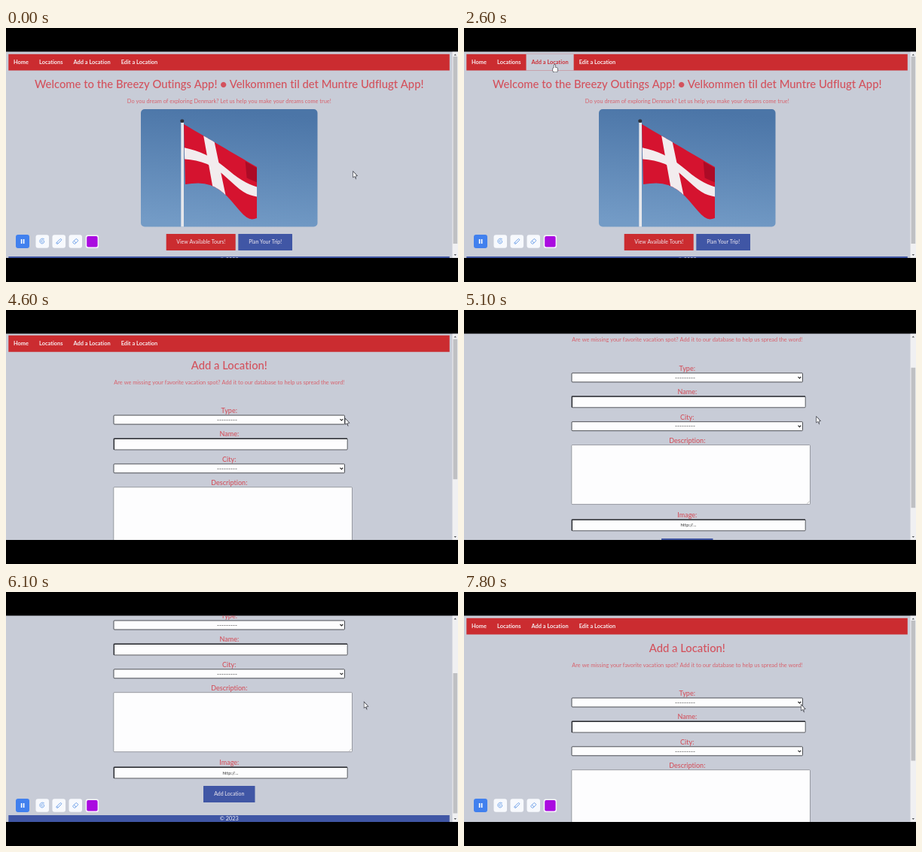
These frames come from a looping animation (600 by 338 pixels, 8 s). An HTML page with a canvas:

```html
<!DOCTYPE html>
<html lang="en">
<head>
<meta charset="utf-8">
<title>Add a location</title>
<style>
  html, body { margin: 0; width: 100%; height: 100%; overflow: hidden; background: #000; }
  canvas { display: block; width: 600px; height: 338px; }
</style>
</head>
<body>
<canvas id="stage"></canvas>
<script>
const W = 600, H = 338, LOOP = 8000;
const TOP = 31.4, BOTTOM = 306, MID = 296.3;
const PAGE_CHANGE = 2900, HOVER_ON = 1070, HOVER_OFF = 3090, TOOLS_BACK = 5500;
const MAX_SCROLL = 103;
const RED = '#cb2c30', BLUE = '#4056a5', BG = '#c8ccd7', INK = '#d3525d', SOFT = '#d8626d';

const canvas = document.getElementById('stage');
const ctx = canvas.getContext('2d');
const ratio = window.devicePixelRatio || 1;
canvas.width = W * ratio;
canvas.height = H * ratio;

// Progress from 0 to 1, eased at both ends
function ramp(t, start, length) {
  const u = Math.max(0, Math.min(1, (t - start) / length));
  return u * u * (3 - 2 * u);
}

// Pointer stops: time, x, y
const stops = [
  [0, 461, 191.5], [1100, 123.5, 53], [1600, 119.5, 49], [2800, 119.5, 49],
  [4600, 450.5, 145], [5100, 468, 142.5], [6100, 475.5, 147], [7500, 447.8, 150.5]
];

function pointerAt(t) {
  const pos = stops[0].slice(1);
  for (let i = 1; i < stops.length; i++) {
    const [t0, x0, y0] = stops[i - 1], [t1, x1, y1] = stops[i];
    const k = ramp(t, t0, t1 - t0);
    pos[0] += (x1 - x0) * k;
    pos[1] += (y1 - y0) * k;
  }
  return pos;
}

// Two wheel notches down, two back up
function scrollAt(t) {
  const notch = start => ramp(t, start, 200);
  return MAX_SCROLL / 2 * (notch(4585) + notch(5060) - notch(6450) - notch(6850));
}

function rect(x, y, w, h, fill, r = 0) {
  ctx.fillStyle = fill;
  ctx.beginPath();
  ctx.roundRect(x, y, w, h, r);
  ctx.fill();
}

function outline(color, width) {
  ctx.strokeStyle = color;
  ctx.lineWidth = width;
  ctx.stroke();
}

function frame(x, y, w, h, color, width = 0.9) {
  rect(x, y, w, h, '#fdfdfe', 1);
  outline(color, width);
}

function trace(points) {
  ctx.beginPath();
  points.forEach(([x, y]) => ctx.lineTo(x, y));
}

function setFont(size, weight = 400) {
  ctx.font = `${weight} ${size}px Lato, "Open Sans", sans-serif`;
  ctx.letterSpacing = '0.01px'; // keeps letters unjoined
}

function text(str, x, y, size, fill, weight, align = 'center') {
  setFont(size, weight);
  ctx.textAlign = align;
  ctx.fillStyle = fill;
  ctx.fillText(str, x, y + size * 0.34);
}

function heading(title, sub) {
  text(title, MID, 75, 14.8, INK, 500);
  text(sub, MID, 97, 7.4, SOFT);
}

function button(label, x, y, w, fill) {
  rect(x, y, w, 22, fill, 0.5);
  text(label, x + w / 2, y + 11, 6.95, '#efe9f0');
}

function navBar(t) {
  rect(3.3, 34.8, 585.5, 21.8, RED);
  const k = ramp(t, HOVER_ON, 300) - ramp(t, HOVER_OFF, 300);
  const mix = (a, b) => Math.round(a + (b - a) * k);
  let x = 10;
  ['Home', 'Locations', 'Add a Location', 'Edit a Location'].forEach((label, i) => {
    setFont(7.4, 700);
    const w = ctx.measureText(label).width;
    const active = i === 2;
    if (active && t >= HOVER_ON && t < HOVER_OFF) rect(x - 7, 34.8, w + 14, 21.8, BG);
    const fill = active ? `rgb(${mix(244, 205)},${mix(238, 48)},${mix(241, 56)})` : '#f8edef';
    text(label, x, 45.5, 7.4, fill, 700, 'left');
    x += w + 14;
  });
}

// Cloth position: u runs from pole to free edge, v from top to bottom
function cloth(u, v) {
  const drop = 80 - 12 * u - 10 * Math.sin(2 * Math.PI * u);
  return [
    236 + 97 * u + 2 * v * (1 - u) + 14 * v * Math.sin(Math.PI * u),
    128 + 57 * u + v * drop
  ];
}

function patch(u0, u1, v0, v1, fill) {
  const steps = 16, upper = [], lower = [];
  for (let i = 0; i <= steps; i++) {
    const u = u0 + (u1 - u0) * i / steps;
    upper.push(cloth(u, v0));
    lower.unshift(cloth(u, v1));
  }
  trace([...upper, ...lower]);
  ctx.fillStyle = fill;
  ctx.fill();
}

function flagPhoto() {
  const sky = ctx.createLinearGradient(300, 108, 285, 265);
  sky.addColorStop(0, '#4b75a7');
  sky.addColorStop(1, '#739bc6');
  rect(179, 108, 234.5, 156.5, sky, 5);
  rect(232.3, 126, 3.7, 138.5, '#e6e7eb');
  rect(231.3, 121.5, 5, 4.5, '#30323a', 2);
  patch(0, 1, 0, 1, '#d5132f');
  patch(0, 1, 0.39, 0.58, '#f2ecee');
  patch(0.27, 0.42, 0, 1, '#f2ecee');
  patch(0.84, 1, 0.02, 0.3, 'rgba(110,0,25,.4)');
}

function footer(y) {
  rect(3.3, y, 585.5, 9, BLUE);
  text('© 2023', MID, y + 4.7, 7.3, '#f0f1f7');
}

function homePage() {
  heading('Welcome to the Breezy Outings App! ● Velkommen til det Muntre Udflugt App!',
    'Do you dream of exploring Denmark? Let us help you make your dreams come true!');
  flagPhoto();
  button('View Available Tours!', 212.7, 274, 92, RED);
  button('Plan Your Trip!', 308.3, 274, 71.7, BLUE);
  footer(304);
}

function selectBox(y) {
  frame(143, y, 306.5, 12, '#3c3e43');
  text('---------', 293.5, y + 6, 8, '#333');
  trace([[443.5, y + 5], [445.4, y + 7], [447.3, y + 5]]);
  outline('#222', 1.1);
}

function inputBox(y, hint = '') {
  frame(143.2, y, 310, 15, '#4a4c52');
  trace([[143.4, y + 15], [143.4, y + 0.4], [453, y + 0.4]]);
  outline('#292b30', 1.3);
  text(hint, 298, y + 7.6, 6, '#333');
}

function textArea(y) {
  frame(142.8, y, 316.7, 79, '#84878e', 0.8);
  trace([[455.5, y + 78], [458.5, y + 75]]);
  outline('#888', 0.6);
}

function formPage() {
  heading('Add a Location!',
    'Are we missing your favorite vacation spot? Add it to our database to help us spread the word!');
  let y = 135.3;
  const field = (label, height, box) => {
    text(label, MID, y, 9, INK, 500);
    box(y + 5.7);
    y += height + 18.9;
  };
  field('Type:', 12, selectBox);
  field('Name:', 15, inputBox);
  field('City:', 12, selectBox);
  field('Description:', 80.3, textArea);
  field('Image:', 15, top => inputBox(top, 'http://...'));
  button('Add Location', 262, y - 3, 68.5, BLUE);
  footer(400);
}

function scrollBar(top, length) {
  rect(592.5, TOP, 7.5, BOTTOM - TOP, '#f0f0f2');
  rect(593.5, top, 5.7, length, '#bfc0c3');
  [[36.4, -2], [301, 2]].forEach(([y, tip]) => {
    trace([[594.6, y], [598, y], [596.3, y + tip]]);
    ctx.fillStyle = '#55575b';
    ctx.fill();
  });
}

// Slanted rounded bar with a cross line, used for pen and eraser
function slantedTool(x, length, width, cut) {
  ctx.save();
  ctx.translate(x, 284);
  ctx.rotate(-Math.PI / 4);
  ctx.beginPath();
  ctx.roundRect(-length / 2, -width / 2, length, width, 1);
  ctx.moveTo(cut, -width / 2);
  ctx.lineTo(cut, width / 2);
  outline('#5a93e4', 0.8);
  ctx.restore();
}

function toolBar() {
  rect(13, 275, 18, 18, '#4180ee', 3);
  [19.8, 22.8].forEach(x => rect(x, 281, 1.6, 6, '#fff'));
  for (let i = 0; i < 3; i++) rect(39.5 + 22 * i, 275.2, 17.5, 17.5, '#f7f9fd', 3);

  const coil = [];
  for (let a = 0; a < 12; a += 0.3) {
    const r = 0.6 + a * 0.29;
    coil.push([48.2 + r * Math.cos(a), 284 + r * Math.sin(a)]);
  }
  trace(coil);
  outline('#5a93e4', 0.8);
  slantedTool(70.3, 8.5, 2.3, -2.8);
  slantedTool(92.2, 7, 3.8, -0.8);

  rect(105.7, 275.5, 17.4, 17.4, '#f8f5fc', 3);
  rect(107.2, 277, 14.4, 14.4, '#aa0be0', 2);
}

function pointer(x, y, hand) {
  ctx.save();
  ctx.translate(x, y);
  if (hand) {
    ctx.beginPath();
    ctx.roundRect(0, 0, 1.7, 6, 0.8);
    ctx.roundRect(-1.4, 3.8, 6, 5.6, 1.6);
  } else {
    trace([[0, 0], [0, 6.8], [1.7, 5.5], [3, 7.7], [2.8, 5.1], [4.7, 5]]);
    ctx.closePath();
  }
  outline('#3b3d45', 1.3);
  ctx.fillStyle = '#fff';
  ctx.fill();
  ctx.restore();
}

function draw(t) {
  const home = t < PAGE_CHANGE;
  const scroll = home ? 0 : scrollAt(t);
  ctx.setTransform(ratio, 0, 0, ratio, 0, 0);
  rect(0, 0, W, H, '#000');

  ctx.save();
  ctx.beginPath();
  ctx.rect(0, TOP, W, BOTTOM - TOP);
  ctx.clip();
  rect(0, 0, W, H, BG);
  ctx.save();
  ctx.translate(0, -scroll);
  navBar(t);
  if (home) homePage();
  else formPage();
  ctx.restore();

  if (home) scrollBar(38, 249);
  else scrollBar(38 + scroll * 70 / MAX_SCROLL, 186.5);
  if (home || t >= TOOLS_BACK) toolBar();
  const [x, y] = pointerAt(t);
  pointer(x, y, t >= 1150 && t < HOVER_OFF);
  ctx.restore();
}

const start = performance.now();
function tick() {
  draw((performance.now() - start) % LOOP);
  requestAnimationFrame(tick);
}
tick();
</script>
</body>
</html>
```
